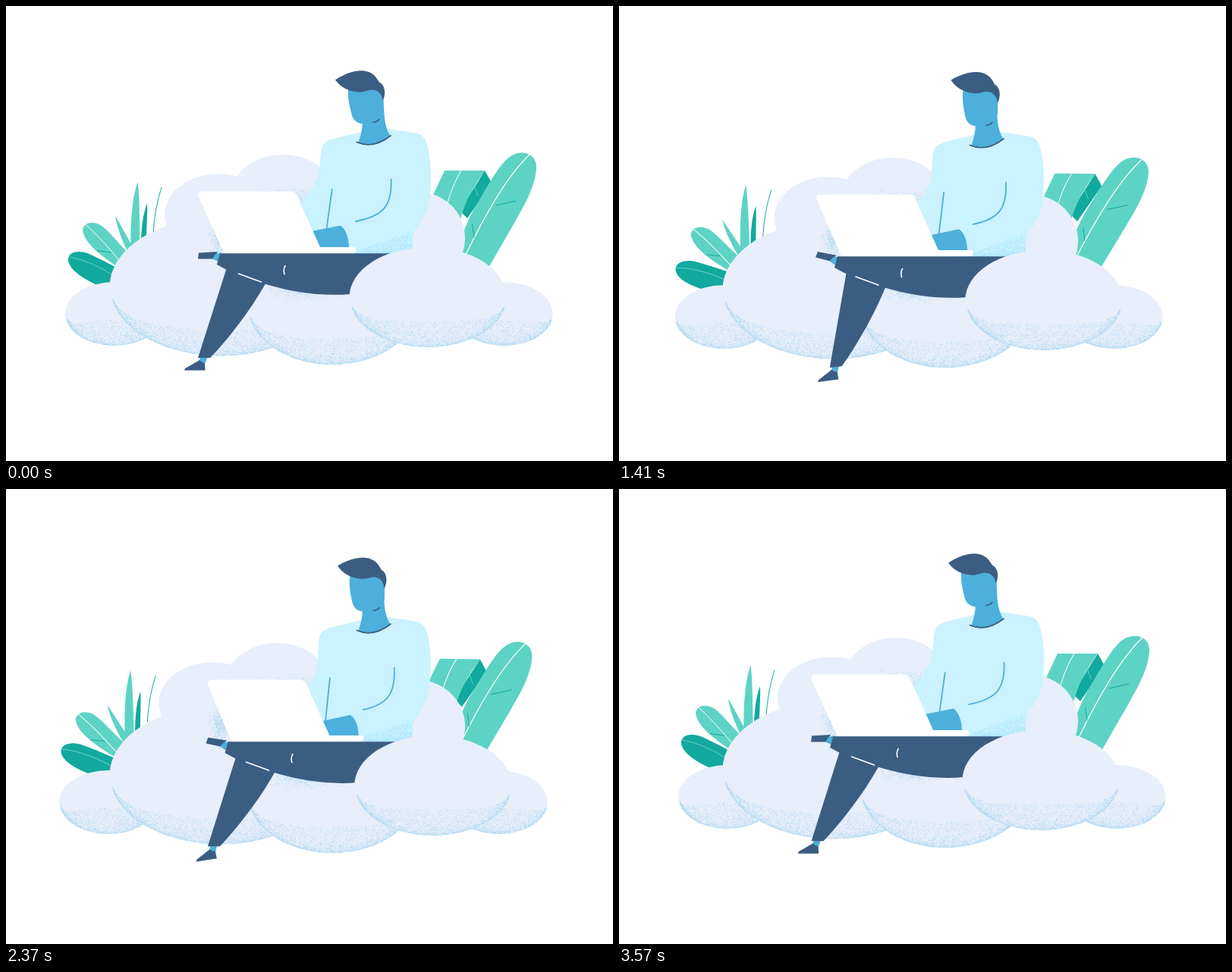
Animation, 800 px wide and 600 px high, one loop 3.6 s. Source, as an HTML page with a canvas:

```html
<!DOCTYPE html>
<html lang="en">
<head>
<meta charset="utf-8">
<style>
html, body { margin: 0; width: 100%; height: 100%; overflow: hidden; background: #fff; }
canvas { display: block; }
</style>
</head>
<body>
<canvas id="stage" width="800" height="600"></canvas>
<script>
const ctx = document.getElementById('stage').getContext('2d');
const LOOP = 3600;
const CLOUD = '#e8eefa', SHIRT = '#caf2ff', SKIN = '#4dafdb', NAVY = '#3b5d82';
const LEAF = '#5dd3c5', DARK = '#12a99e', WHITE = '#fff';

let seed = 7;
const rnd = () => (seed = seed * 16807 % 2147483647) / 2147483647;
const gauss = () => rnd() + rnd() + rnd() + rnd() - 2;

const swing = (t, period) => (1 - Math.cos(2 * Math.PI * t / period)) / 2;
const smooth = (t, from, to) => {
  const u = Math.min(1, Math.max(0, (t - from) / (to - from)));
  return u * u * (3 - 2 * u);
};
const pulse = (t, a, b, c, d) => smooth(t, a, b) - smooth(t, c, d);

function fill(color, path) {
  ctx.fillStyle = color;
  ctx.fill(new Path2D(path));
}
function line(color, width, path) {
  ctx.strokeStyle = color;
  ctx.lineWidth = width;
  ctx.lineCap = 'round';
  ctx.stroke(new Path2D(path));
}
function shifted(dx, dy, draw) {
  ctx.save();
  ctx.translate(dx, dy);
  draw();
  ctx.restore();
}
function turned(degrees, x, y, draw) {
  ctx.save();
  ctx.translate(x, y);
  ctx.rotate(degrees * Math.PI / 180);
  ctx.translate(-x, -y);
  draw();
  ctx.restore();
}

// Stippled shading is rendered once per patch.
function stipple(color, count, place) {
  const layer = document.createElement('canvas');
  layer.width = 800;
  layer.height = 600;
  const c = layer.getContext('2d');
  c.fillStyle = color;
  for (let i = 0; i < count; i++) {
    const [x, y] = place();
    c.fillRect(x, y, 0.75, 0.75);
  }
  return layer;
}
const spot = (x, y, w, h, count) =>
  stipple('#a5d6f1', count, () => [x + gauss() * w, y + gauss() * h]);

function blob(x, y, rx, ry) {
  const shade = stipple('#a5d6f1', rx * 24, () => {
    const a = Math.acos(1.96 * rnd() - 0.98);
    const lift = rnd() ** 2.2 * 34 * (0.2 + 0.8 * Math.sin(a)) * Math.sin(a);
    return [x + (rx - 1) * Math.cos(a), y + (ry - 1) * Math.sin(a) - lift];
  });
  return dx => shifted(dx, 0, () => {
    bump(x, y, rx, ry);
    ctx.drawImage(shade, 0, 0);
  });
}
function bump(x, y, rx, ry) {
  ctx.fillStyle = CLOUD;
  ctx.beginPath();
  ctx.ellipse(x, y, rx, ry, 0, 0, 7);
  ctx.fill();
}

const leftBlob = blob(142.5, 406, 64.5, 42);
const mainBlob = blob(283, 370, 146.5, 91.5);
const middleBlob = blob(430, 395, 112, 78);
const rightBlob = blob(656, 406, 64.5, 42);
const frontBlob = blob(556, 384, 103.5, 66);
const shadows = [spot(382, 257, 32, 13, 750), spot(282, 304, 10, 20, 650), spot(390, 372, 38, 11, 850)];
const shirtShade = stipple('#9fe0f7', 1100, () => {
  const u = Math.sqrt(rnd());
  return [453 + 82 * u, 326 - 30 * u * rnd() ** 2];
});

function leftPlants(t) {
  const droop = pulse(t, 0, 1200, 1300, 3450);
  const sway = pulse(t, 500, 1500, 1900, 3500);
  turned(-1.4 * sway, 168, 315, () => {
    fill(LEAF, 'M173.500 232C166 255 163 285 165 345H177C176 285 176.500 255 173.500 232Z');
    fill(DARK, 'M186 260C181 274 178 288 177.500 330H185C184 300 187 275 186 260Z');
  });
  turned(-5 * sway, 161, 317, () => fill(LEAF, 'M144 276.500C146 290 151 306 165 334L172 326C159 304 152 290 144 276.500Z'));
  line(DARK, 1, 'M205 239Q196 266 194 300');
  turned(-3 * sway, 150, 335, () => {
    fill(LEAF, 'M101 295C103 284 118 282 130 293C140 302 150 315 175 340L165 356C128 332 103 314 101 295Z');
    line(WHITE, 1, 'M105 288Q128 309 152 339');
    line(DARK, 1, 'M120 322.500L138 325');
  });
  turned(-9.5 * droop, 145, 358, () => {
    fill(DARK, 'M82 334C83 322 100 322 112 328C125 334 140 342 175 360V388C118 371 82 352 82 334Z');
    line('#69cfc6', 1, 'M84 331Q113 336 146 358');
  });
}

function rightPlants(t, s) {
  const tilt = 1.2 * s + 2.3 * pulse(t, 0, 500, 700, 1300);
  shifted(-10 * s, 0, () => turned(tilt, 595, 270, () => {
    fill(DARK, 'M631 217L640 233L608 280L598 270Z');
    fill(LEAF, 'M578 217H631C615 240 606 255 598 285L555 266Z');
    line(WHITE, 1, 'M600 217Q588 236 580 266');
    line(LEAF, 1, 'M617 236L622 250');
  }));
  const lean = pulse(t, 1400, 2100, 2400, 3100);
  shifted(-10 * s, 0, () => turned(3.3 * s - 1.7 * lean, 590, 340, () => {
    fill(LEAF, 'M590 345C600 300 609 280 626 252C642 225 655 202 669 196C685 189 700 198 699 214C697 241 681 266 670 286L632 352Z');
    line(WHITE, 1.2, 'M690 196Q652 232 605 330');
    line(DARK, 1, 'M646 263L672 257M617 305L614.500 288');
  }));
}

function torso(s) {
  fill(SHIRT, `M${430 - 2 * s} 175.500L468 166L503 162L539 167.500C548 169 552 173 555 182
    C560 200 561 225 ${559 - s} 248C557 268 548 286 538 296L533 327H440L${405 + 10 * s} 302L${388 + 10 * s} 261
    C${398 + 6 * s} 250 ${405 + s} 240 411 225C${414 - 4 * s} 215 ${414 - 4 * s} 205 ${415.5 - 4 * s} 190
    C${417 - 4 * s} 182 420 178 ${430 - 2 * s} 175.500Z`);
  ctx.drawImage(shirtShade, 0, 0);
  line(SKIN, 1.8, `M${429.7 - 4 * s} 242L${422.5 - 2 * s} ${294 + 6 * s}`);
  line(SKIN, 1.8, `M${507.5 + 6 * s} 228.500C${509 + 6 * s} 264 ${497 + 8 * s} 277 ${461 + 14 * s} 284`);
}

function head(nod) {
  fill(SKIN, 'M470 147C470 164 467 173 464 181Q486 187 506 171C500 160 498.500 150 498 132Z');
  line(NAVY, 1.7, 'M462.500 179.500Q484 189 507 171');
  turned(2.9 * nod, 487, 158, () =>
    fill(SKIN, 'M451.500 108C449.500 118 452.500 130 455 141C457 151 463 155.500 473 155.500C488 155.500 498 148 498 136L497 106Z'));
  turned(2.9 * nod, 514, 168, () =>
    fill(NAVY, `M434 97.500C453 85 471 82 482 89C487 92 489 96 492 100.500C500 104 501 117 496.500 125
      C496 117 491 111 483 110.500C477 110 474 114 464 113.500C450 112 441 107 434 97.500Z`));
  line(NAVY, 1.5, 'M484 153.500Q489 153 492 149.500');
}

function lowerLeg(kick, footAngle) {
  const [lx, ly, rx, ry] = [253 + 33 * kick, 464 + 17 * kick, 269 + 33 * kick, 464 + 13 * kick];
  turned(-footAngle, (lx + rx) / 2, (ly + ry) / 2, () => shifted((lx + rx) / 2, (ly + ry) / 2, () => {
    fill(SKIN, 'M-3 -3L5 -2L1 8L-7 4Z');
    fill(NAVY, 'M-26 16.500L-25 14L-6 3Q-3 6 1 7L1.500 16.500Z');
  }));
  fill(NAVY, `M${291 + 4 * kick} 345L${lx} ${ly}L${rx} ${ry}C${292 + 27 * kick} ${440 + 6 * kick} ${322 + 13 * kick} ${402 + 4 * kick} ${342 + 4 * kick} ${366 + 2 * kick}Z`);
}

function thigh(toeAngle) {
  turned(toeAngle, 277, 331, () => {
    fill(NAVY, 'M254 325.500L279 324L273 333.500L253 333.500Z');
    fill(SKIN, 'M276 327L284 325L280 337L272 333.500Z');
  });
  fill(NAVY, 'M282 326.200H525V380H453C417 383 380 378 341 366.500L291 348L278 341Z');
}

function laptop(s) {
  const b = 14.5 * s, p = 17.6 * s;
  fill(SKIN, `M${403 + p} ${297 + 3 * s}L${441 + 18 * s} ${289.5 + 2 * s}C${449 + 18 * s} 296 ${452 + 18 * s} 308 ${452 + 18 * s} 320H${410 + b}Z`);
  fill(WHITE, `M${259 + p} 244.500H${375 + p}Q${380.5 + p} 244.500 ${383.5 + p} 250L${414 + p} 318H${458 + b}
    Q${461 + b} 318 ${461 + b} 322Q${461 + b} 326 ${457 + b} 326H${292 + b}Q${287 + b} 326 ${285 + b} 321
    L${254 + p} 252Q${251 + p} 244.500 ${259 + p} 244.500Z`);
}

function draw(t) {
  const s = swing(t, 1800), nod = swing(t, 900), beat = t % 1200;
  const kick = pulse(beat, 0, 400, 800, 1200);
  const tap = pulse(beat, 0, 980, 980, 1180);
  ctx.clearRect(0, 0, 800, 600);
  shifted(0, 10 * s, () => {
    rightPlants(t, s);
    shifted(-11 * s, 0, () => {
      leftPlants(t);
      bump(280, 275, 71, 53.5);
      bump(365, 250, 68, 54);
    });
    leftBlob(-11 * s);
    mainBlob(0);
    middleBlob(0);
    bump(543, 306, 62, 61);
    shadows.forEach(layer => ctx.drawImage(layer, 0, 0));
    rightBlob(-10 * s);
    torso(s);
    head(nod);
    shifted(17.6 * s, 0, () => lowerLeg(kick, 12 * s + 25.5 * tap));
    shifted(15 * s, 0, () => thigh(14.5 * nod + 10 * tap * tap));
    shifted(14 * s, 0, () => line(WHITE, 1.6, 'M306.500 353L336.500 364M368 342.500Q365 348 367 353.500'));
    laptop(s);
    frontBlob(9.5 * s);
  });
}

function frame() {
  draw(Math.floor(performance.now() % LOOP / 30) * 30);
  requestAnimationFrame(frame);
}
frame();
</script>
</body>
</html>
```
